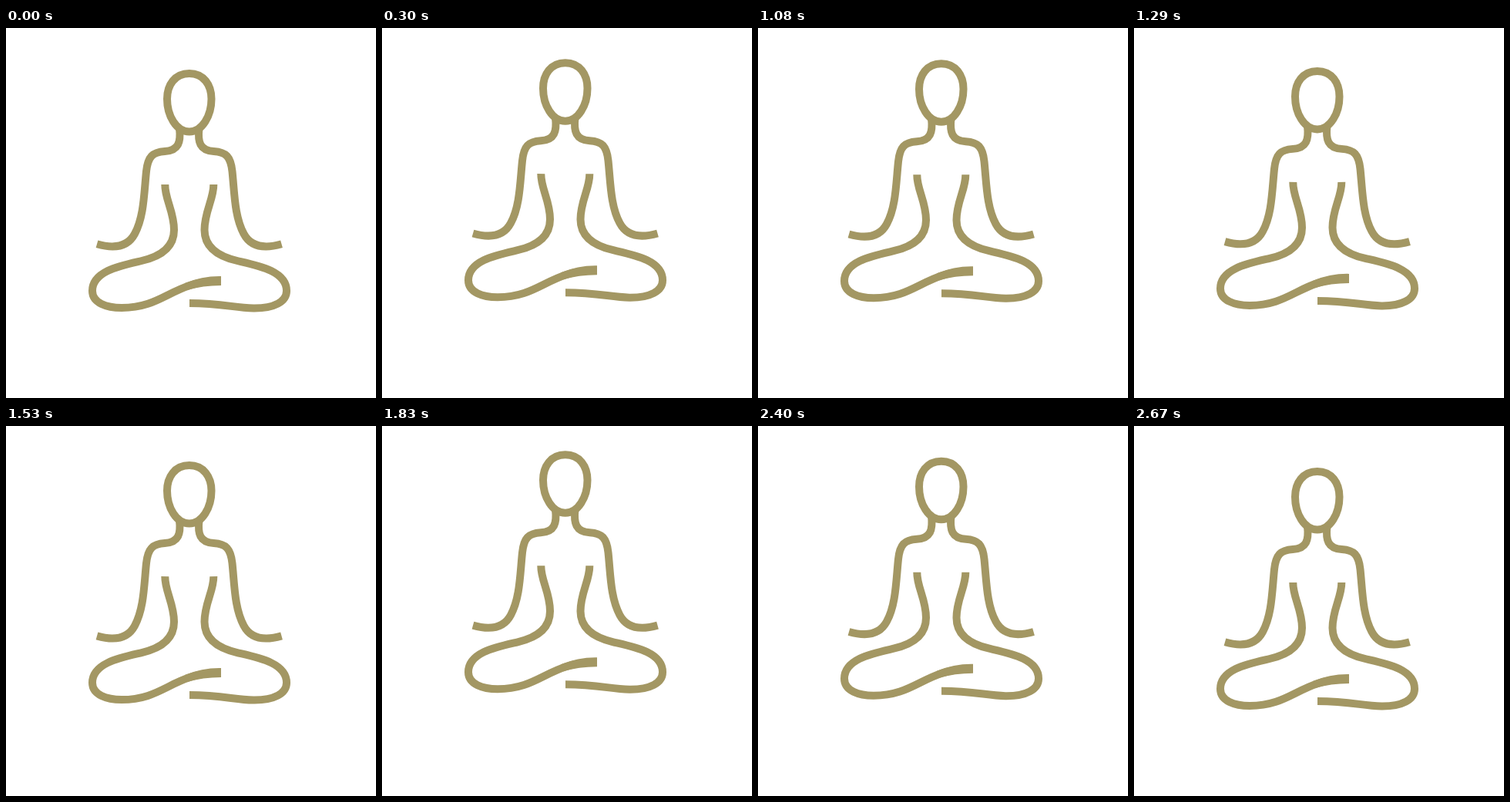
Animation of 480 by 480 pixels, one loop 2.7 s. Source, as an HTML page:

```html
<!DOCTYPE html>
<html lang="en">
<head>
<meta charset="utf-8">
<title>Floating meditation</title>
<style>
  html, body { margin: 0; width: 100%; height: 100%; overflow: hidden; background: #fff; }
  svg { display: block; width: 100%; height: 100%; }
  .line { fill: none; stroke: #a39763; stroke-width: 10; }
  .tip { fill: #a39763; }
</style>
</head>
<body>
<svg viewBox="0 0 480 480">
  <defs>
    <path id="arm" d="M225 130C227 148 224 159 206 160C190 161 184 167 182 186C179 215 179 245 167 267C158 284 140 286.500 118 280.300"/>
  </defs>
  <g id="figure">
    <g class="line">
      <path d="M237.800 59C219 59 209 74 209 92C209 114 221 134.500 237.800 134.500C254.500 134.500 266.500 114 266.500 92C266.500 74 256.500 59 237.800 59Z"/>
      <use href="#arm"/>
      <use href="#arm" transform="matrix(-1 0 0 1 475.500 0)"/>
      <path d="M206.300 203C206 222 218 238 218 262C218 284 202 296 176 302C150 308 112 315 112 341C112 357 131 363 150 363C206 363 216 328 279 328"/>
      <path d="M269.300 203C269.500 222 257.500 238 257.500 262C257.500 284 274 296 300 302C326 308 364 315 364 341C364 355 348 363.800 321 363.500C296 363 280 357 238 357"/>
    </g>
    <path class="tip" d="M279 322V334Q255 334 235 340L232 331Q255 321.500 279 322Z"/>
  </g>
</svg>
<script>
  const LOOP = 2700, STEP = 30;
  // [time in ms, vertical offset]
  const keys = [[0, 0], [678, -31.2], [1358, 0], [2036, -31.2], [2670, 0], [LOOP, 0]];
  const figure = document.getElementById('figure');

  function offsetAt(t) {
    const i = keys.findIndex(([end]) => t < end);
    const [t0, y0] = keys[i - 1], [t1, y1] = keys[i];
    return y0 + (y1 - y0) * (t - t0) / (t1 - t0);
  }

  function draw() {
    const t = Math.floor(performance.now() % LOOP / STEP) * STEP;
    figure.setAttribute('transform', `translate(0 ${offsetAt(t).toFixed(2)})`);
    requestAnimationFrame(draw);
  }
  draw();
</script>
</body>
</html>
```
